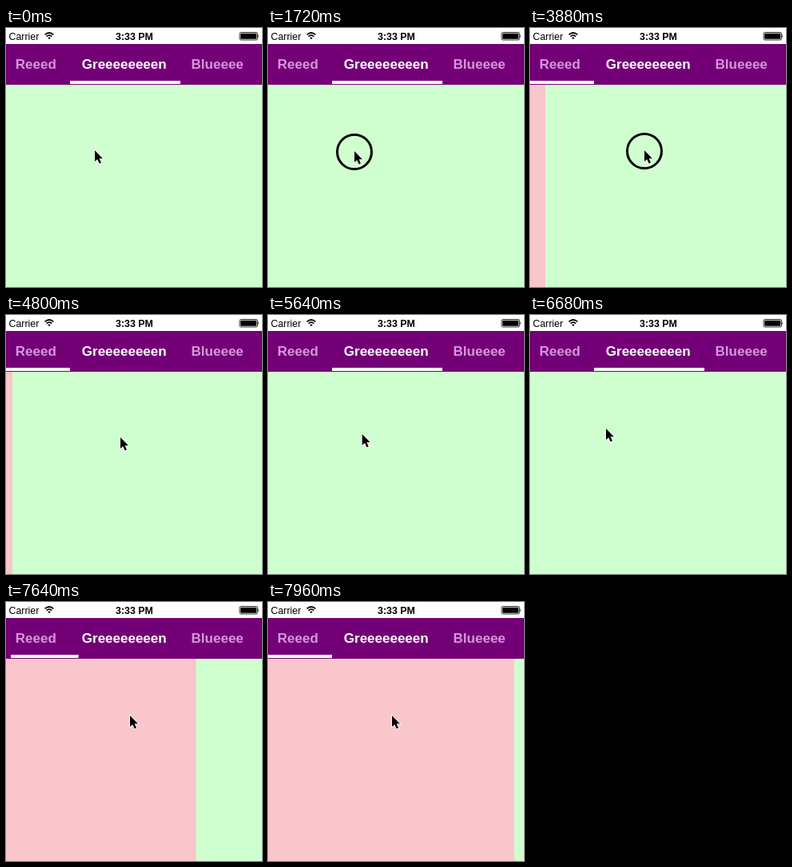
These frames come from a looping animation (320 by 324 pixels, 8 s). An HTML page:

```html
<!DOCTYPE html>
<html>
<head>
<meta charset="utf-8">
<style>
  html, body { margin: 0; width: 100%; height: 100%; overflow: hidden; background: #fff; }
  svg { display: block; width: 320px; height: 324px; font-family: "Liberation Sans", Arial, sans-serif; }
  .status { font-size: 12.4px; }
  .tabs { font-size: 17px; font-weight: bold; fill: #d795dc; }
</style>
</head>
<body>
<svg viewBox="0 0 320 324">
  <rect y="71" width="320" height="253" fill="#d0ffcf"/>
  <rect id="red" y="71" width="0" height="253" fill="#f8c6cb"/>

  <g class="status">
    <rect width="320" height="20" fill="#fff"/>
    <text x="3.5" y="14.5">Carrier</text>
    <text x="160.5" y="14.5" text-anchor="middle" font-weight="bold">3:33 PM</text>
    <g fill="none" stroke="#000" stroke-width="1.7">
      <path d="M48.6 8.4Q54 3.6 59.4 8.4M50.6 10.6Q54 7.6 57.4 10.6"/>
      <path d="M52.2 12L54 14.2L55.8 12Q54 10.8 52.2 12Z" fill="#000" stroke="none"/>
    </g>
    <rect x="292" y="5.5" width="22.5" height="9.5" rx="1.8" fill="none" stroke="#000" stroke-width=".8"/>
    <rect x="293.2" y="6.7" width="20.1" height="7.1" rx=".8"/>
    <path d="M315.2 8.6q1.6 1.6 0 3.3z"/>
  </g>

  <g class="tabs">
    <rect y="20" width="320" height="51" fill="#740077"/>
    <text x="11.8" y="51">Reeed</text>
    <text x="94.8" y="51" fill="#fff">Greeeeeeeen</text>
    <text x="231.6" y="51">Blueeee</text>
    <rect id="bar" y="66" height="4" fill="#fff"/>
  </g>

  <g id="pointer">
    <circle id="ring" cy="1" r="21.5" fill="none" stroke="#000" stroke-width="3"/>
    <path d="M0 0V14L3.2 11.2L5.7 16.6L8 15.6L5.7 10.3H10Z" stroke="#fff" stroke-width="1.6" paint-order="stroke"/>
  </g>
</svg>
<script>
const LOOP = 8000, STEP = 40;
const $ = id => document.getElementById(id);
const red = $('red'), bar = $('bar'), ring = $('ring'), pointer = $('pointer');

// pointer tip: [time, x, y]
const path = [
  [0, 111, 153], [40, 109, 153.5], [120, 108, 154], [1760, 108, 154],
  [2240, 124, 153.5], [2840, 135.8, 153], [3320, 143, 153], [5120, 143, 153],
  [5880, 106, 147], [6640, 95, 142], [7320, 95, 142], [7390, 110, 142],
  [7440, 155, 142], [LOOP, 155, 142]
];

const clamp = v => Math.min(1, Math.max(0, v));
const mix = (a, b, k) => a + (b - a) * k;
const ease = (t, start) => {
  const k = clamp((t - start) / 300);
  return k * k * (3 - 2 * k);
};

function pointerAt(t) {
  const i = path.findIndex(p => p[0] > t);
  const a = path[i - 1], b = path[i];
  const k = (t - a[0]) / (b[0] - a[0]);
  return [mix(a[1], b[1], k), mix(a[2], b[2], k)];
}

// width of the red page pulled in from the left
function scrollAt(t, x) {
  const decay = start => Math.exp((start - t) / 167);
  if (t < 4656) return Math.max(0, x - 124);
  if (t < 7390) return Math.round(19 * decay(4656));
  if (t < 7440) return mix(0, 47, (t - 7390) / 50);
  return 320 - 273 * decay(7440);
}

function draw(t) {
  const [x, y] = pointerAt(t);
  pointer.setAttribute('transform', `translate(${x} ${y})`);
  const pressed = (t >= 1720 && t < 4656) || (t >= 6800 && t < 7440);
  ring.setAttribute('visibility', pressed ? 'visible' : 'hidden');
  red.setAttribute('width', scrollAt(t, x));

  // the marker jumps to the first tab when a drag starts, and returns once it settles
  const k = ease(t, 2220) - ease(t, 5280) + ease(t, 7391);
  bar.setAttribute('x', mix(80, 0, k));
  bar.setAttribute('width', mix(138, 80, k));
}

const origin = performance.now();
function tick() {
  const t = (performance.now() - origin) % LOOP;
  draw(Math.floor(t / STEP) * STEP);
  requestAnimationFrame(tick);
}
tick();
</script>
</body>
</html>
```
